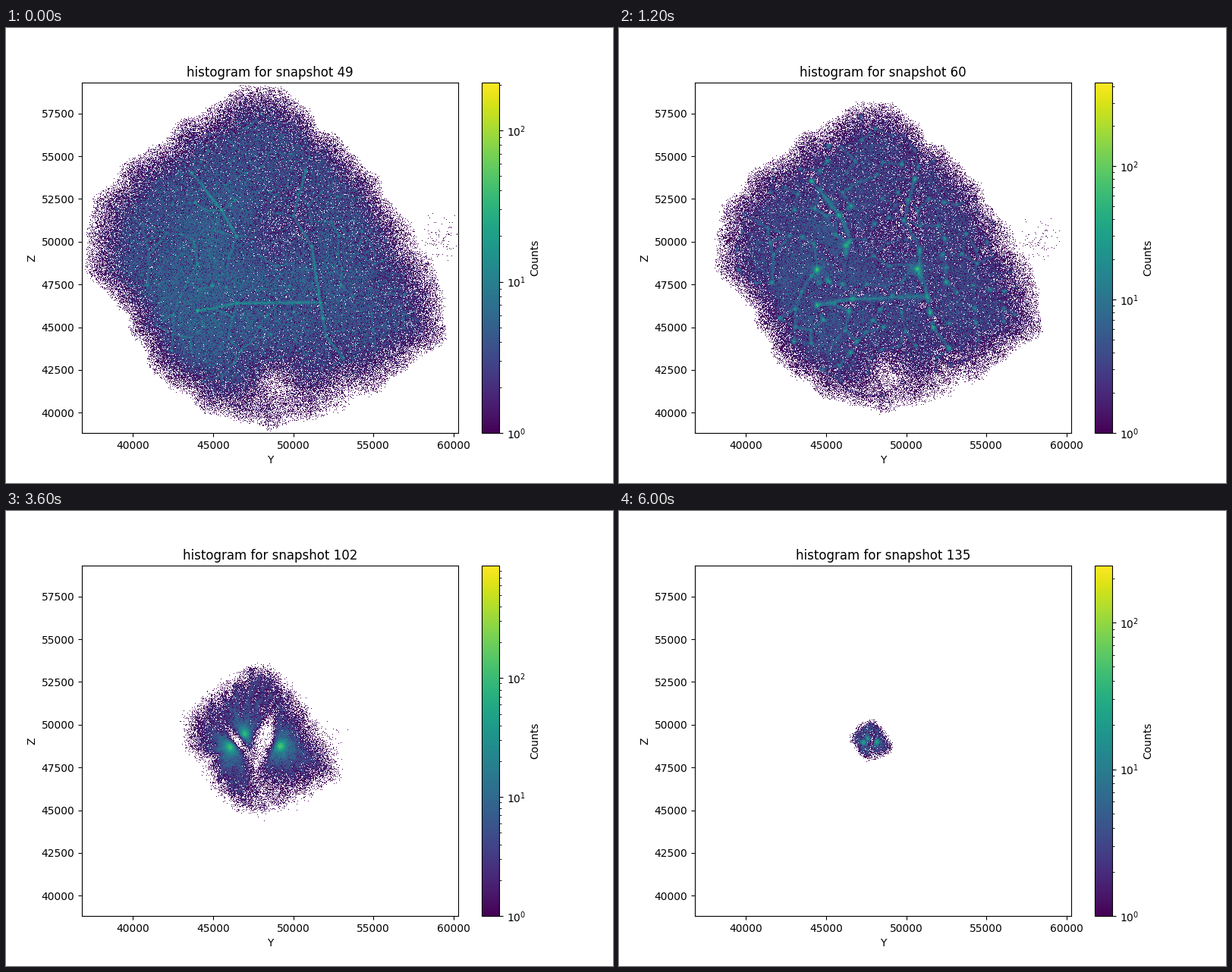
A matplotlib script for the animation above (6.2 s loop, 800 by 600 pixels).

```python
import numpy as np
import matplotlib.pyplot as plt
from matplotlib.animation import FuncAnimation
from matplotlib.colors import LogNorm

FRAMES, STEP = 31, 200
LEFT, TOP, W, H = 100, 72, 496, 462
X0, X1, Y0, Y1 = 36801, 60308, 38813, 59308
CENTER_Y = 303

# Plot quantities and strength of collapse at the key times
KEYS = [0, 2, 6, 10, 14, 22, 30]
SNAPSHOT = [49, 53, 60, 70, 86, 118, 135]
LOG_MAX = [2.316, 2.567, 2.628, 3.065, 2.962, 2.929, 2.388]
SCALE = [1, .97, .905, .785, .612, .295, .118]
CENTER_X = [344, 344, 344, 344, 340, 334, 333]
CLUMP_R = [3.5, 4.5, 8, 17, 30, 30, 12]
FILAMENT_R = [3.5, 4.5, 6.5, 10, 12, 12, 6]
HOST_R = [5, 12, 32, 58, 95, 290, 125]
JITTER = [1.1, 1.2, 1.5, 2.2, 3.2, 8, 13]

# Comoving coordinates: stage pixels from the centre, y down
RIM = [212, 255, 228, 220, 224, 216, 210, 198,
       242, 235, 209, 212, 232, 186, 177, 178]
HOSTS = np.array([(53, 16), (-92, 18), (-50, -18)], np.float32)
HOST_POWER = np.array([1, .85, .75], np.float32)
CHAINS = [[(50, -115), (34, -55), (58, -15), (69, 59), (77, 102), (100, 132)],
          [(-92, 70), (-40, 60), (69, 59)],
          [(-100, -112), (-60, -63), (-40, -28)]]
DENSE = [(-85, 60, 58, .35), (-62, -58, 34, .3), (60, 25, 48, .25)]
THIN = [(10, 170, 26, -.9), (95, 188, 38, -.6),
        (195, -20, 40, -.5), (12, -30, 34, -.4)]

PEAK_DENSITY = 6
CLUMPS = 150
HALF, NX, NY = 300, 605, 650

rng = np.random.default_rng(49)


def rim_ratio(u, v):
    a = np.arctan2(v, u)
    angles = np.linspace(0, 2 * np.pi, len(RIM), endpoint=False)
    r = np.interp(a, angles, RIM, period=2 * np.pi)
    r *= 1 + .013 * np.sin(17 * a) + .01 * np.sin(29 * a + 1)
    return np.hypot(u, v) / r


def scatter_particles():
    box = 260
    u, v = rng.uniform(-box, box, (2, PEAK_DENSITY * (2 * box) ** 2))
    q = rim_ratio(u, v)
    chance = .6 * (.05 + np.clip((1 - q) / .25, 0, 1) ** 1.2) * (q < 1)
    for x, y, size, gain in DENSE + THIN:
        r2 = (u - x) ** 2 + (v - y) ** 2
        chance *= 1 + gain * np.exp(-r2 / (2 * size ** 2)) / .6 ** (gain > 0)
    keep = rng.random(u.size) < chance
    stray = rng.normal((228, -25), (14, 14), (110, 2))
    cloud = np.column_stack([u[keep], v[keep]])
    return np.vstack([cloud, stray]).astype(np.float32)


def scatter_clumps():
    spots = rng.uniform(-250, 250, (8 * CLUMPS, 2))
    spots = spots[rim_ratio(*spots.T) < .92]
    chosen = [p for chain in CHAINS for p in chain]
    for p in spots:
        gaps = np.hypot(*(np.array(chosen) - p).T)
        if gaps.min() > 18 and len(chosen) < CLUMPS:
            chosen.append(p)
    return np.array(chosen, np.float32)


def web(clumps):
    """Segments of the main chains, then each clump to its neighbours."""
    segments = [(a, b, 2.2) for c in CHAINS for a, b in zip(c, c[1:])]
    for p in clumps:
        near = np.argsort(np.hypot(*(clumps - p).T))[1:3]
        segments += [(p, clumps[j], rng.uniform(.5, 1.2)) for j in near]
    return segments


def nearest_clump(points, clumps):
    best = np.full(len(points), np.inf, np.float32)
    index = np.zeros(len(points), int)
    blur = rng.normal(1, .12, (7, len(points))).astype(np.float32)
    for i, p in enumerate(clumps):
        d = ((points - p) ** 2).sum(1) * blur[i % 7]
        closer = d < best
        best[closer], index[closer] = d[closer], i
    return index


def nearest_on_web(points, segments):
    best = np.full(len(points), np.inf, np.float32)
    foot = np.zeros_like(points)
    power = np.ones(len(points), np.float32)
    x, y = points.T
    for a, b, strength in segments:
        (ax, ay), (bx, by) = a, b
        reach = 40
        i = np.flatnonzero((x > min(ax, bx) - reach) & (x < max(ax, bx) + reach)
                           & (y > min(ay, by) - reach)
                           & (y < max(ay, by) + reach))
        a = np.array(a, np.float32)
        ab = np.array(b, np.float32) - a
        s = np.clip((points[i] - a) @ ab / (ab @ ab), 0, 1)
        f = a + s[:, None] * ab
        d = ((points[i] - f) ** 2).sum(1) / strength ** 2
        closer = d < best[i]
        j = i[closer]
        best[j], foot[j], power[j] = d[closer], f[closer], strength
    foot[np.isinf(best)] = points[np.isinf(best)]
    return foot, power


def pull(points, target, radius):
    """Draw points in; those inside the radius fall nearly to the target."""
    d = points - target
    r4 = (d ** 2).sum(1) ** 2
    return target + d * ((r4 / (r4 + radius ** 4 + 1e-6)) ** .4)[:, None]


start = scatter_particles()
count = len(start)
clumps = scatter_clumps()
keyed = sum(map(len, CHAINS))
clump_power = rng.lognormal(-.1, .35, len(clumps)).astype(np.float32)
clump_power[:keyed] = 1.5
foot, foot_power = nearest_on_web(start, web(clumps))
owner = nearest_clump(start, clumps)
host = nearest_clump(start, HOSTS)

# Every particle falls at its own pace, a few hardly at all
pace = rng.uniform(.45, 1.1, count).astype(np.float32)
pace[rng.random(count) < .04] = .2
shake = rng.normal(size=(count, 2)).astype(np.float32)


def at(t, values):
    return float(np.interp(t, KEYS, values))


def histogram(t):
    p = pull(start, foot, at(t, FILAMENT_R) * foot_power * pace)
    p = pull(p, clumps[owner], at(t, CLUMP_R) * clump_power[owner] * pace)
    p = pull(p, HOSTS[host], at(t, HOST_R) * HOST_POWER[host] * pace)
    p = p + at(t, JITTER) * shake
    col = ((p[:, 0] + HALF) * NX / (2 * HALF)).astype(int)
    row = ((p[:, 1] + HALF) * NY / (2 * HALF)).astype(int)
    inside = (col >= 0) & (col < NX) & (row >= 0) & (row < NY)
    n = np.bincount(row[inside] * NX + col[inside], minlength=NX * NY)
    return np.ma.masked_equal(n.reshape(NY, NX), 0)


def extent(t):
    half, cx = HALF * at(t, SCALE), at(t, CENTER_X)
    x = [X0 + (px - LEFT) * (X1 - X0) / W for px in (cx - half, cx + half)]
    y = [Y1 - (py - TOP) * (Y1 - Y0) / H
         for py in (CENTER_Y + half, CENTER_Y - half)]
    return x + y


fig, ax = plt.subplots(figsize=(8, 6), dpi=100)
image = ax.imshow(histogram(0), extent=extent(0), aspect="auto",
                  cmap="viridis", interpolation="nearest",
                  norm=LogNorm(1, 10 ** LOG_MAX[0]))
fig.colorbar(image, ax=ax, label="Counts")
ax.set(xlim=(X0, X1), ylim=(Y0, Y1), xlabel="Y", ylabel="Z")
title = ax.set_title("")


def update(i):
    image.set_data(histogram(i))
    image.set_extent(extent(i))
    ax.set(xlim=(X0, X1), ylim=(Y0, Y1))
    image.set_clim(1, 10 ** at(i, LOG_MAX))
    title.set_text(f"histogram for snapshot {round(at(i, SNAPSHOT))}")
    return image, title


anim = FuncAnimation(fig, update, frames=FRAMES, interval=STEP,
                     repeat=True, repeat_delay=0)
plt.show()
```
